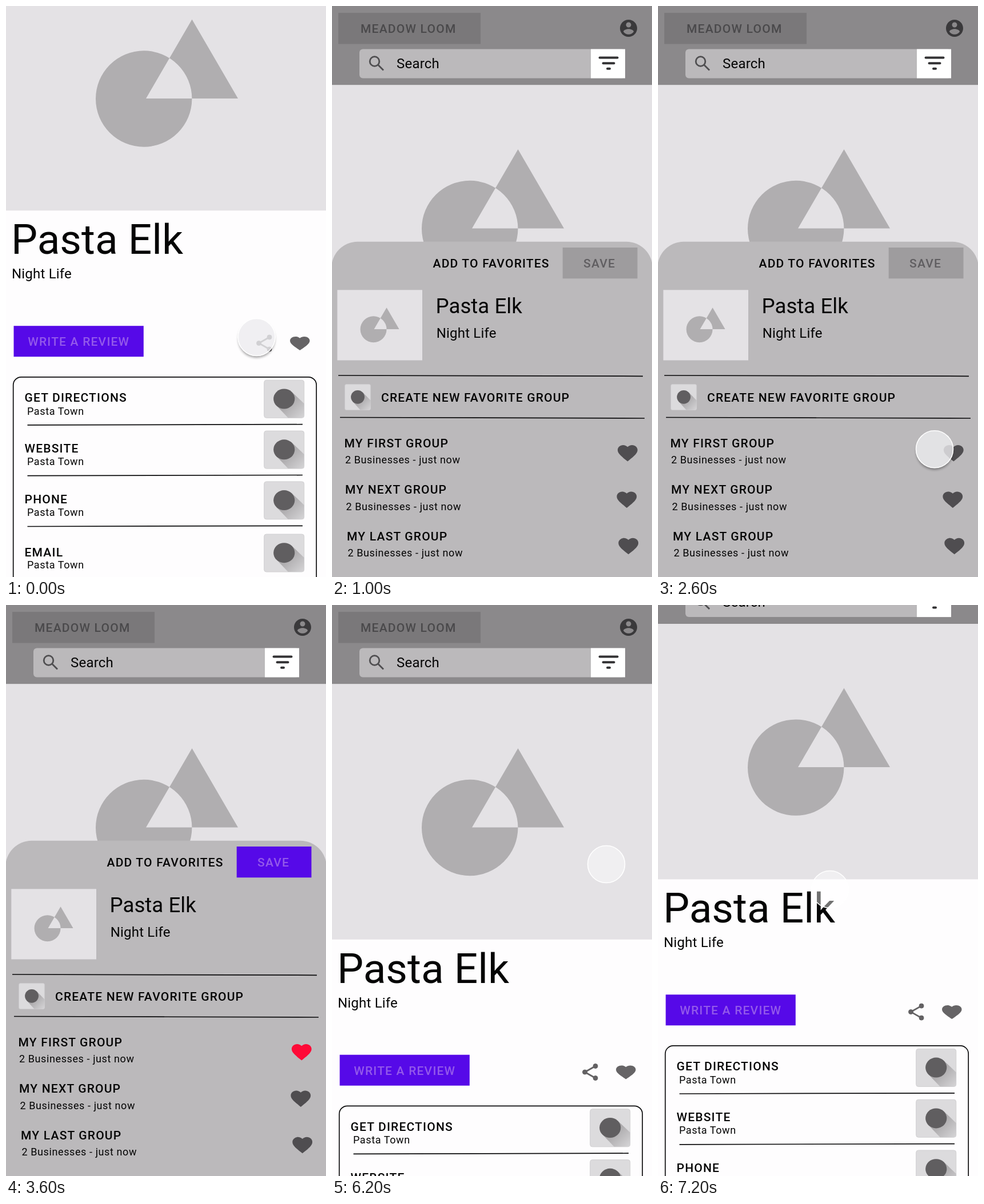
These frames come from a looping animation (560x1000 px, 7.4 s). An HTML page:

```html
<!DOCTYPE html>
<html lang="en">
<head>
<meta charset="utf-8">
<title>Add to favorites</title>
<style>
html, body { margin: 0; width: 100%; height: 100%; overflow: hidden; background: #fefdfe; }
svg { display: block; width: 560px; height: 1000px; }
text { font-family: Roboto, sans-serif; fill: #050505; white-space: pre; }
.title { font-size: 73px; }
.name { font-size: 36.7px; }
.body { font-size: 24px; letter-spacing: .2px; }
.note { font-size: 18px; letter-spacing: .6px; }
.caps { font-size: 21px; font-weight: 500; letter-spacing: 1.2px; }
.rule { stroke: #0b0b0c; stroke-width: 1.7; }
</style>
</head>
<body>
<svg viewBox="0 0 560 1000">
  <defs>
    <path id="heart" d="M12 21.35l-1.45-1.32C5.4 15.36 2 12.28 2 8.5 2 5.42 4.42 3 7.5 3c1.74 0 3.41.81 4.5 2.09C13.09 3.81 14.76 3 16.5 3 19.58 3 22 5.42 22 8.5c0 3.78-3.4 6.86-8.55 11.54z"/>
    <g id="placeholder" fill="#b0aeb0">
      <path fill-rule="evenodd" d="M157 390a84.2 84.2 0 1 0 168.4 0a84.2 84.2 0 1 0-168.4 0zM325.5 251L406 389.5H245z"/>
    </g>
    <linearGradient id="cast" x1=".4" y1=".4" x2="1" y2="1">
      <stop offset="0" stop-color="#aaa8aa"/><stop offset="1" stop-color="#d6d5d7"/>
    </linearGradient>
    <g id="tile">
      <rect width="70" height="66" rx="4" fill="#dcdbdd" stroke="#d0cfd1"/>
      <path d="M48 20L70 41V62Q70 66 66 66H42L22 45z" fill="url(#cast)"/>
      <ellipse cx="35" cy="32.7" rx="18.6" ry="17.5" fill="#605e60"/>
    </g>
    <filter id="blur" x="-30%" y="-30%" width="160%" height="160%"><feGaussianBlur stdDeviation="2"/></filter>
    <clipPath id="outside">
      <path clip-rule="evenodd" d="M-50-50H50V50H-50zM-33 0a33 33 0 1 0 66 0a33 33 0 1 0-66 0z"/>
    </clipPath>
  </defs>
  <rect width="560" height="1000" fill="#fefdfe"/>
  <g id="page"></g>
  <g id="sheet"></g>
  <g id="cursor">
    <g clip-path="url(#outside)"><circle id="shade" cy="4" r="32" fill="#000" opacity=".36" filter="url(#blur)"/></g>
    <circle id="disc" r="32.5"/>
    <circle id="ring" r="32.5" fill="none" stroke="#fff" stroke-width="1.6"/>
  </g>
</svg>
<script>
const LOOP = 7400, STEP = 200, SCROLL = 227.5;
const PLACE = "Pasta Elk", KIND = "Night Life", PURPLE = "#5609e8", LILAC = "#9359ea";
const el = id => document.getElementById(id);

const text = (cls, x, y, str, fill = "#050505") =>
  `<text class="${cls}" x="${x}" y="${y}" style="fill:${fill}">${str}</text>`;
const rect = (x, y, w, h, fill, rx = 0) =>
  `<rect x="${x}" y="${y}" width="${w}" height="${h}" rx="${rx}" fill="${fill}"/>`;
const rule = (x1, y1, x2, y2) =>
  `<line class="rule" x1="${x1}" y1="${y1}" x2="${x2}" y2="${y2}"/>`;
const heart = (cx, cy, w, h, fill, id = "") =>
  `<use ${id && `id="${id}"`} href="#heart" fill="${fill}"
    transform="translate(${cx} ${cy}) scale(${w / 20} ${h / 18.35}) translate(-12 -12.17)"/>`;

function header() {
  return rect(0, 0, 560, 138.5, "#8b898b")
    + rect(11, 12, 249, 54.5, "#7a787a")
    + text("caps", 50, 47, "MEADOW LOOM", "#4a494b")
    + `<path transform="translate(501 21) scale(1.5)" fill="#3a393b" d="M12 2C6.48 2 2 6.48 2 12s4.48 10 10 10 10-4.48 10-10S17.52 2 12 2zm0 3c1.66 0 3 1.34 3 3s-1.34 3-3 3-3-1.34-3-3 1.34-3 3-3zm0 14.2c-2.5 0-4.71-1.28-6-3.22.03-1.99 4-3.08 6-3.08 1.99 0 5.97 1.09 6 3.08-1.29 1.94-3.5 3.22-6 3.22z"/>`
    + rect(48, 75.5, 465, 51, "#bbb9bb", 6)
    + rect(453, 75.5, 60, 51, "#fff")
    + `<g fill="none" stroke="#4f4e50" stroke-width="2.8"><circle cx="74.5" cy="97" r="8.3"/><path d="M80.5 103L90 112.5"/></g>`
    + text("body", 113, 108.5, "Search")
    + `<path d="M468.5 90.5h31M474.5 100.3h19M482 109.8h4" stroke="#333234" stroke-width="4" stroke-linecap="round"/>`;
}

function row(label, i) {
  const y = 882.8 + 88.8 * i + (i === 3 ? 3.3 : 0);
  const labelY = 920.5 + 89 * i + (i === 3 ? 4 : 0);
  return text("caps", 32.5, labelY, label)
    + text("note", 37, y + 60.2, "Pasta Town")
    + rule(37.5, y + 78.6, 519, y + 77.4)
    + `<use href="#tile" x="451.7" y="${y}"/>`;
}

function page() {
  const share = `<g fill="#636163" stroke="#636163"><path d="M461 807.5L442.5 818L461 828.5" fill="none" stroke-width="2.8"/>
    <circle cx="461" cy="807.5" r="4"/><circle cx="442.5" cy="818" r="4"/><circle cx="461" cy="828.5" r="4"/></g>`;
  return header()
    + rect(0, 138.5, 560, 447.3, "#e4e2e5")
    + `<use href="#placeholder"/>`
    + text("title", 9, 661.5, PLACE)
    + text("body", 10, 704.7, KIND)
    + rect(13.5, 787.7, 227.3, 54, PURPLE)
    + text("caps", 38.3, 822.7, "WRITE A REVIEW", LILAC)
    + share + heart(514.3, 818.5, 34.5, 24, "#666466")
    + `<rect x="12.7" y="877.3" width="530.5" height="520" rx="14" fill="none" stroke="#0b0b0c" stroke-width="1.7"/>`
    + ["GET DIRECTIONS", "WEBSITE", "PHONE", "EMAIL"].map(row).join("");
}

function sheet() {
  const groups = [["FIRST", 0], ["NEXT", 1.5], ["LAST", 4.5]].map(([word, dx], i) =>
    text("caps", 21.5 + dx, 773 + 81.4 * i, `MY ${word} GROUP`)
    + text("note", 23 + dx, 801.3 + 81.3 * i, "2 Businesses - just now")
    + heart([517.3, 515.8, 518.7][i], 783.3 + 81.4 * i, 34.8, 28.5, "#4f4d50", "heart" + i)).join("");
  return rect(-1, 412.8, 562, 700, "#bbb9bb", 46)
    + text("caps", 176.5, 458, "ADD TO FAVORITES")
    + `<rect id="save" x="403.7" y="423" width="130.8" height="54.3"/>`
    + text("caps", 440, 458, `<tspan id="saveText">SAVE</tspan>`)
    + rect(9.3, 497.3, 148.7, 123.2, "#e4e2e5")
    + `<use href="#placeholder" transform="translate(6.7 459.7) scale(.273)"/>`
    + text("name", 181.5, 538, PLACE)
    + text("body", 182.7, 581.3, KIND)
    + rule(11, 647, 544, 648.3) + rule(14, 720.5, 547, 722)
    + `<use href="#tile" transform="translate(22.6 662.6) scale(.64 .68)"/>`
    + text("caps", 86, 693, "CREATE NEW FAVORITE GROUP")
    + groups;
}

// Pointer keys: time, x, y, strength
const TRACKS = [
  [[0, 438.5, 580, 1], [200, 490, 587, 1], [400, 514, 591, 1], [600, 514, 591, 1], [800, 514, 591, .5]],
  [[1400, 170, 577, 1], [1600, 315.3, 602.5, 1], [1800, 440, 700, 1], [2000, 517, 784, 1],
   [2400, 448, 780, 1], [2600, 484, 776.3, 1], [2800, 513, 785, 1], [3000, 513, 785, .5]],
  [[4400, 517, 660, .5], [4600, 523, 540, 1], [4800, 512.7, 464, 1], [5000, 524, 436, 1], [5200, 505, 448, 1], [5400, 505, 448, .5]],
  [[6200, 480, 454, .5], [6400, 480, 454, 1], [6600, 480, 454, 1], [6800, 480, 454, .5]],
  [[7200, 301, 498, .5]]
];

function pointer(t) {
  const track = TRACKS.find(k => t >= k[0][0] && t <= k[k.length - 1][0]);
  if (!track) return null;
  const n = track.findIndex(k => k[0] >= t), b = track[n], a = track[n - 1] || b;
  const u = b === a ? 1 : (t - a[0]) / (b[0] - a[0]);
  return [1, 2, 3].map(j => a[j] + (b[j] - a[j]) * u);
}

function scrollAt(t) {
  if (t < 1000) return SCROLL;
  return t < 7000 ? 0 : t < 7200 ? 28 : 105.4;
}

function draw(ms) {
  const t = Math.floor(ms % LOOP / STEP) * STEP;
  const chosen = t >= 3400;
  el("page").setAttribute("transform", `translate(0 ${-scrollAt(t)})`);
  el("sheet").style.display = t >= 1000 && t < 5600 ? "" : "none";
  el("heart0").style.fill = chosen ? "#ff0a37" : "#4f4d50";
  el("save").style.fill = chosen ? PURPLE : "#9e9c9e";
  el("saveText").style.fill = chosen ? LILAC : "#605e61";

  const p = pointer(t);
  el("cursor").style.display = p ? "" : "none";
  if (!p) return;
  const [x, y, strength] = p, solid = strength > .9;
  el("cursor").setAttribute("transform", `translate(${x} ${y})`);
  el("disc").style.fill = solid ? "rgba(237,237,239,.8)" : `rgba(255,255,255,${strength * .86})`;
  el("shade").style.display = solid ? "" : "none";
}

el("page").innerHTML = page();
el("sheet").innerHTML = sheet();
const start = performance.now();
function tick(now) {
  draw(Math.max(0, now - start));
  requestAnimationFrame(tick);
}
draw(0);
requestAnimationFrame(tick);
</script>
</body>
</html>
```
